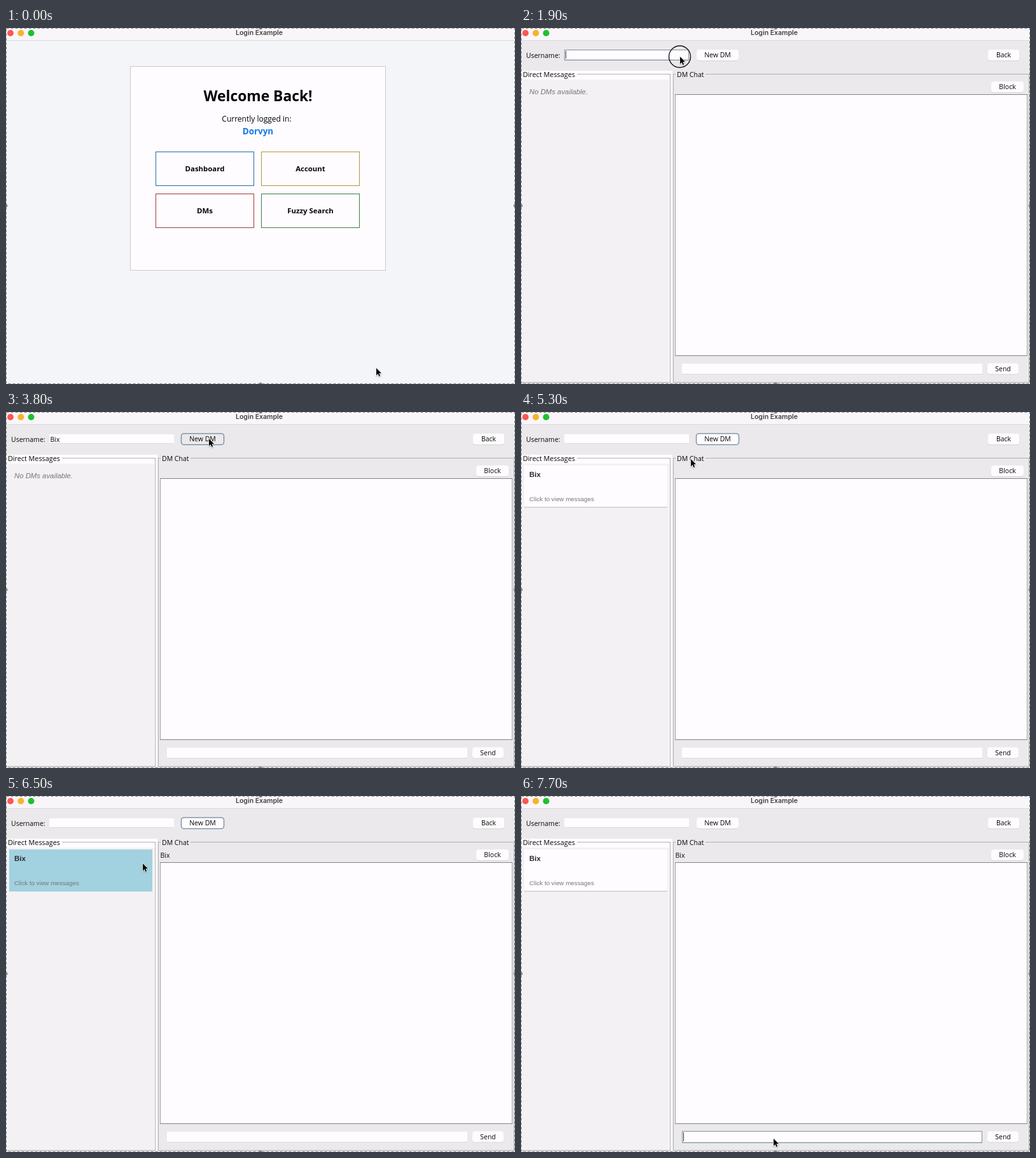
An HTML page with a canvas that plays this animation: 800 px wide and 559 px high, repeating every 8 s.

```html
<!DOCTYPE html>
<html lang="en">
<head>
<meta charset="utf-8">
<title>Login Example</title>
<style>
  html, body { margin: 0; width: 100%; height: 100%; overflow: hidden; }
  canvas { display: block; width: 800px; height: 559px; }
</style>
</head>
<body>
<canvas id="stage" width="800" height="559"></canvas>
<script>
const ctx = document.getElementById('stage').getContext('2d');
const LOOP = 8000, STEP = 100;
const USER = 'Dorvyn', PEER = 'Bix';
const WHITE = '#fefcfe';
const UI = '"Open Sans", "Noto Sans", sans-serif';
const SANS = '"Liberation Sans", Arial, sans-serif';
const LABEL = `500 10.5px ${UI}`;

// Pointer rests: time, x, y
const PATH = [
  [0, 582, 534], [900, 362, 297], [1300, 362, 297], [1700, 250, 45],
  [3100, 250, 45], [3500, 319, 42], [4900, 319, 42], [5700, 215, 106],
  [6700, 215, 106], [7200, 397, 538], [LOOP, 397, 538]
];
// Click rings: from, to
const CLICKS = [[1100, 1300], [1800, 2200], [3500, 3800], [6000, 6300], [7200, 7500]];
const within = (t, a, b) => t >= a && t < b;

function pointerAt(t) {
  let i = 1;
  while (t > PATH[i][0]) i++;
  const [t0, x0, y0] = PATH[i - 1], [t1, x1, y1] = PATH[i];
  const k = (t - t0) / (t1 - t0), e = k * k * (3 - 2 * k);
  return [x0 + (x1 - x0) * e, y0 + (y1 - y0) * e];
}

function fill(x, y, w, h, color) {
  ctx.fillStyle = color;
  ctx.fillRect(x, y, w, h);
}

function box(x, y, w, h, color, width = 1) {
  ctx.strokeStyle = color;
  ctx.lineWidth = width;
  ctx.strokeRect(x + 0.5, y + 0.5, w - 1, h - 1);
}

function text(str, x, y, font, color = '#080808', align = 'left') {
  ctx.font = font;
  ctx.fillStyle = color;
  ctx.textAlign = align;
  ctx.fillText(str, x, y);
}

function dot(x, y, r, color) {
  ctx.fillStyle = color;
  ctx.beginPath();
  ctx.arc(x, y, r, 0, Math.PI * 2);
  ctx.fill();
}

function button(str, x, y, w, focused, pressed) {
  ctx.beginPath();
  ctx.roundRect(x, y + 0.8, w, 17, 4);
  ctx.fillStyle = '#cfcdcf';
  ctx.fill();
  ctx.beginPath();
  ctx.roundRect(x, y, w, 17, 4);
  ctx.fillStyle = pressed ? '#ebe9eb' : WHITE;
  ctx.fill();
  if (focused) {
    ctx.beginPath();
    ctx.roundRect(x - 0.5, y - 0.2, w + 1, 17.5, 4);
    ctx.strokeStyle = '#6d88a1';
    ctx.lineWidth = 1.3;
    ctx.stroke();
  }
  text(str, x + w / 2, y + 12, LABEL, '#080808', 'center');
}

function field(x, y, w, h, str, focused) {
  fill(x, y, w, h, WHITE);
  fill(x, y + h - 1, w, 1, '#dddbdd');
  text(str, x + 1.5, y + 11.5, LABEL);
  if (focused) {
    box(x, y - 1, w, h + 2, '#7f93a3');
    const end = str ? ctx.measureText(str).width : 0;
    fill(Math.round(x + 1.5 + end), y + 1, 1, h - 3, '#333');
  }
}

function frame() {
  fill(0, 0, 800, 20, '#f9f6f9');
  fill(0, 19, 800, 1, '#dedade');
  dot(7, 8, 5, '#fd5750');
  dot(23.3, 8, 5, '#f7b428');
  dot(39.5, 8, 5, '#1cc132');
  text('Login Example', 398, 11.3, '600 10.5px Inter, sans-serif', '#414041', 'center');
}

function edge() {
  ctx.setLineDash([4, 3]);
  box(0, 0, 800, 559, '#858585');
  ctx.setLineDash([]);
  for (const [x, y] of [[400, 0], [400, 559], [0, 279], [800, 279]]) dot(x, y, 2.5, '#858585');
}

function tile(str, x, y, color) {
  box(x, y, 155, 54, color, 1.1);
  text(str, x + 77.5, y + 31, `bold 11.4px ${UI}`, '#050505', 'center');
}

function home(hover) {
  fill(0, 20, 800, 539, '#f4f5f8');
  fill(195, 60, 402, 321, WHITE);
  box(195, 60, 402, 321, '#cdc8ca');
  text('Welcome Back!', 396, 115, `bold 22.8px ${UI}`, '#050505', 'center');
  text('Currently logged in:', 394, 147, `12px ${UI}`, '#050505', 'center');
  text(USER, 396, 166.5, `bold 13.4px ${UI}`, '#1877e6', 'center');
  tile('Dashboard', 235, 194, '#3672ae');
  tile('Account', 401, 194, '#b49c45');
  tile('DMs', 235, 260, hover ? '#653d40' : '#a54448');
  tile('Fuzzy Search', 401, 260, '#48854f');
}

function messages(t, x, y) {
  const added = t >= 5000;
  const typed = t < 4400 ? PEER.slice(0, (t >= 2700) + (t >= 2800) + (t >= 3000)) : '';
  const hover = added && x < 230 && y > 84 && y < 150;

  fill(0, 20, 800, 539, '#ebe9eb');
  text('Username:', 8, 46.5, LABEL);
  field(68, 35, 196, 15, typed, within(t, 1800, 3700));
  button('New DM', 276, 34, 66, within(t, 3700, 7300), within(t, 3700, 4400));
  button('Back', 734, 34, 49);

  // Conversation list
  fill(0, 67, 238, 490, WHITE);
  fill(1, 81, 232, 475, '#f3f1f3');
  fill(88, 72, 147, 1, '#b2b0b2');
  fill(234, 72, 1, 485, '#b2b0b2');
  fill(1, 556, 234, 1, '#b2b0b2');
  text('Direct Messages', 3, 77, `500 10.8px ${UI}`);
  if (added) {
    fill(5, 84, 225, 66, hover ? '#a2d1e0' : WHITE);
    if (!hover) fill(5, 149, 225, 1, '#bfbdbf');
    text(PEER, 13, 102, `bold 11.5px ${SANS}`, '#2c2c2e');
    text('Click to view messages', 13, 140, `9.8px ${SANS}`, '#777');
  } else {
    text('No DMs available.', 13, 104, `italic 11.35px ${SANS}`, '#777');
  }

  // Chat pane
  box(239, 72, 560, 485, '#b2b0b2');
  fill(243, 72, 47, 1, '#ebe9eb');
  text('DM Chat', 245, 77, LABEL);
  if (t >= 6300) text(PEER, 242.5, 96.5, LABEL);
  button('Block', 739, 84, 51);
  fill(242, 104, 554, 411, WHITE);
  box(242, 104, 554, 411, '#a3a1a3');
  fill(242, 104, 554, 1, '#858385');
  fill(242, 514, 554, 1, '#858385');
  field(253, 527, 472, 17, '', t >= 7300);
  button('Send', 733, 526.5, 49);
}

function pointer(x, y) {
  ctx.save();
  ctx.translate(x, y);
  ctx.beginPath();
  [[0, 0], [0, 11.4], [2.6, 9], [4.4, 13], [6.2, 12.2], [4.5, 8.3], [8, 8.1]]
    .forEach(([px, py]) => ctx.lineTo(px, py));
  ctx.closePath();
  ctx.shadowColor = 'rgba(0,0,0,.3)';
  ctx.shadowBlur = 2;
  ctx.shadowOffsetY = 1;
  ctx.strokeStyle = '#fff';
  ctx.lineWidth = 1.4;
  ctx.stroke();
  ctx.shadowColor = 'transparent';
  ctx.fillStyle = '#050505';
  ctx.fill();
  ctx.restore();
}

function draw(now) {
  const t = Math.floor((now % LOOP) / STEP) * STEP;
  const [x, y] = pointerAt(t);
  if (t < 1300) home(x < 390 && y < 314);
  else messages(t, x, y);
  frame();
  edge();
  if (CLICKS.some(([a, b]) => within(t, a, b))) {
    ctx.beginPath();
    ctx.arc(x - 0.5, y, 17, 0, Math.PI * 2);
    ctx.strokeStyle = '#161616';
    ctx.lineWidth = 1.4;
    ctx.stroke();
  }
  pointer(x, y);
}

let start;
function tick(now) {
  start ??= now;
  draw(now - start);
  requestAnimationFrame(tick);
}
requestAnimationFrame(tick);
</script>
</body>
</html>
```
